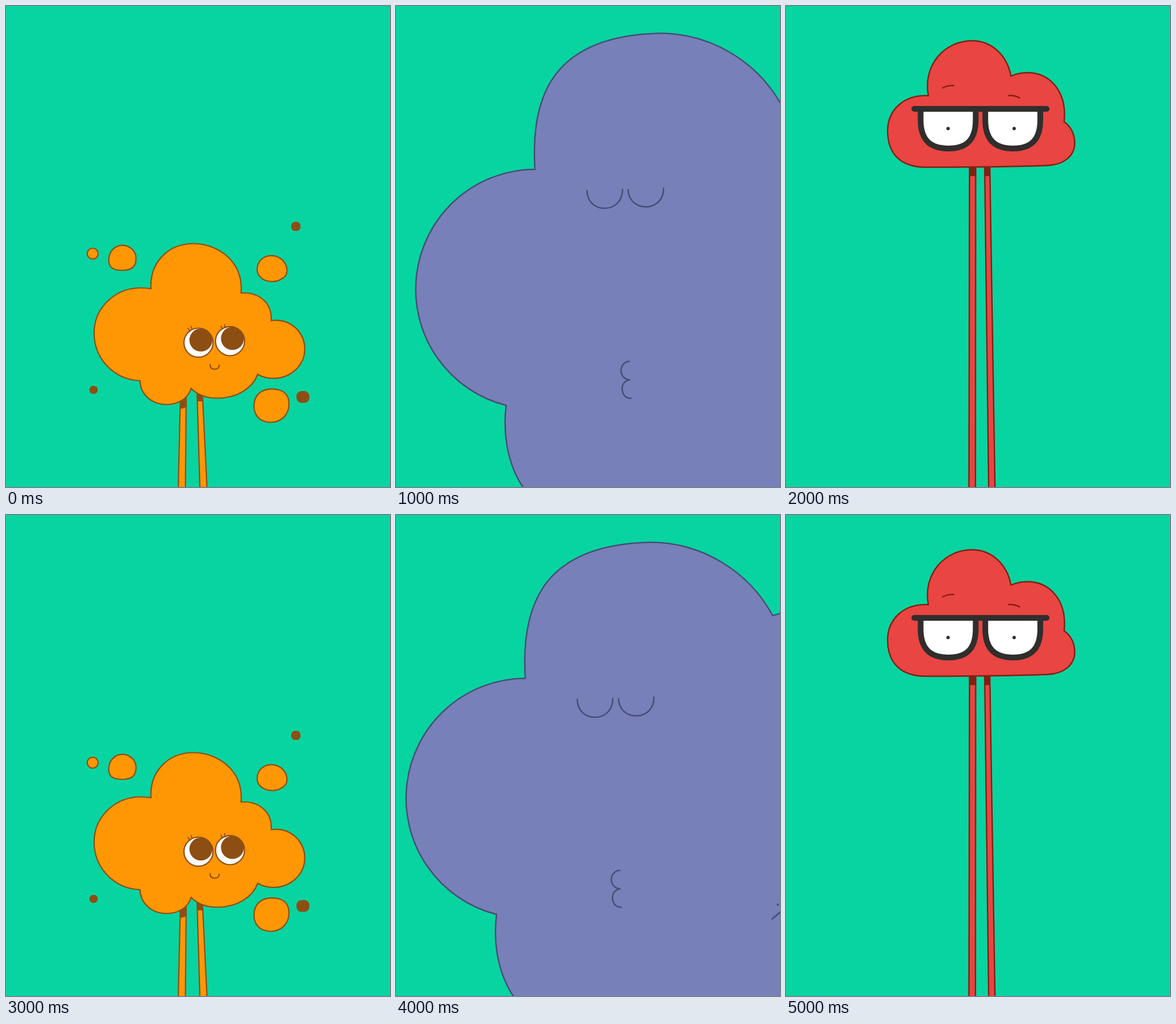
An HTML page for the animation above (6000 ms loop, 669 px wide and 837 px high).

```html
<!DOCTYPE html>
<html lang="en">
<head>
<meta charset="utf-8">
<title>Clouds</title>
<style>
  html, body { margin: 0; height: 100%; overflow: hidden; background: #08d4a1; }
  svg { display: block; width: 669px; height: 837px; }
  .scene { display: none; stroke-linejoin: miter; stroke-linecap: round; }
  .line { fill: none; }
  #orange { fill: #ff9604; stroke: #8d4e14; stroke-width: 2.2; }
  #orange .dark { fill: #8d4e14; stroke: none; }
  #purple { fill: #7780b8; stroke: #484d76; stroke-width: 2.5; }
  #purple .dark { fill: #484d76; stroke: none; }
  #red { fill: #e94542; stroke: #841f12; stroke-width: 2.4; }
  #red .dark { fill: #841f12; stroke: none; }
  #red .glasses { stroke: #302e2d; stroke-width: 10; }
  #red .pupil { fill: #302e2d; stroke: none; }
  .white { fill: #fff; }
</style>
</head>
<body>
<svg viewBox="0 0 669 837">
  <g id="orange" class="scene">
    <path d="M304 670L300 845H312.5L314 670Z M332.5 660L338 845H350.5L341.5 660Z"/>
    <path class="dark" d="M303 670H315V697Q309 701 303 701Z M331.5 660H342L343 688H333Z"/>
    <path d="M252.5 492C250 447 282 413.5 326 413.5C370 413.5 414 445 409.5 499.5
      C440 497 464 516 462 547.5C497 543 520.5 569 520.5 597C520.5 626 495 648 466 648
      C456 648 446 645.5 438.5 641C430 664 404 682.5 368 682.5C350 682.5 334 677 322.5 665.5
      C317 684 299 693.5 280 693.5C253 693.5 234 675 233.5 652C187 650 153.5 613 153.5 569
      C153.5 525 190 490.5 235 490.5C241 490.5 247 491 252.5 492Z"/>
    <circle class="white" cx="335.3" cy="585.8" r="25.3"/>
    <circle class="white" cx="390.3" cy="583.2" r="25.3"/>
    <circle class="dark" cx="339.5" cy="581.3" r="20"/>
    <circle class="dark" cx="394.5" cy="578.5" r="20"/>
    <path class="line" stroke-width="1.8" d="M317 561L320.5 566M322.5 557.5L324 563M374.5 557L377 562M381 554.5L382 560"/>
    <path class="line" d="M355.5 624C355.5 629 358.5 632 363.5 632S371.5 629 371.5 625"/>
    <circle cx="151" cy="431" r="9.5"/>
    <path d="M203 416.3C215 416.3 226 426 226.5 438C227 453 220 460 203 460S179 455 179 442C179 427 190 416.3 203 416.3Z"/>
    <path d="M462 434.3C477 434.3 489.5 446 489.5 460C489.5 470 484 473 478 476C474 478.5 469 479.5 464 479.5C448 479.5 437.5 470 437.5 458.5C437.5 444 449 434.3 462 434.3Z"/>
    <path d="M463 666.3C482 666.3 493 675 493 692C493 711 480 724.5 461 724.5S432 712 432 696C432 678 444 666.3 463 666.3Z"/>
    <rect class="dark" x="497" y="375.5" width="16" height="16" rx="6.5"/>
    <rect class="dark" x="145.3" y="661" width="14.6" height="14" rx="6.5"/>
    <rect class="dark" x="506" y="670" width="22.6" height="20.6" rx="9"/>
  </g>

  <g id="purple" class="scene">
    <path d="M242 284.3C234 155 274 52 459 47.5A243 243 0 0 1 673 175L720 162V860H236L221 837
      C195 798 185.5 745 192 695A208.5 208.5 0 0 1 242 284.3Z"/>
    <path class="line" d="M332.5 321C333 340 346 352 363.5 352S395 339 394.5 319"/>
    <path class="line" d="M404.5 319.5C404.5 337 418 349.5 435.5 349.5S467 336 466 317"/>
    <path class="line" d="M406.5 618.5C398 618.5 392 626 392 634.5C392 643.5 399 650.5 408 650.5
      C399 651 394 658 394 666C394 676 400 683 409.5 682.5"/>
    <path class="line" d="M672 703L690 688"/>
    <circle class="dark" cx="682" cy="678" r="2"/>
  </g>

  <g id="red" class="scene">
    <path d="M319.8 270L318.7 845H330L330.5 270Z M346 270L353.2 845H364.2L354.9 270Z"/>
    <path class="dark" d="M319 275H331V296H319Z M345 275H355.5L356 296H346Z"/>
    <path d="M248 156C238 103 276 60.5 324 60.5C358 60.5 385 85 392 122C401 118 411 116 420 116
      C461 116 490 150 484.5 201.5C497 210 503 224 503 238C503 262 483 276.5 455 277.5
      C400 279.5 330 280.5 243 280.5C198 280.5 177 255 177 218C177 180 206 154 248 156Z"/>
    <path class="line" d="M273 142.5Q282 137.5 292 138.5M388 156Q397 154.5 407 160"/>
    <path class="glasses white" d="M234.5 179V198C234.5 232 250 248 283 248S330.5 232 330.5 198V179"/>
    <path class="glasses white" d="M347.2 179V198C347.2 232 363 248 395.5 248S443 232 443 198V179"/>
    <path class="glasses" d="M223.5 179H454"/>
    <circle class="pupil" cx="282.4" cy="213.2" r="2.9"/>
    <circle class="pupil" cx="397.5" cy="213.2" r="2.9"/>
  </g>
</svg>
<script>
  const BEAT = 1000, BEATS = 6;
  const scenes = ["orange", "purple", "red"].map(id => document.getElementById(id));
  const start = performance.now();

  function draw() {
    const beat = Math.floor((performance.now() - start) / BEAT) % BEATS;
    scenes.forEach((scene, i) => {
      scene.style.display = i === beat % scenes.length ? "inline" : "none";
    });
    // The purple cloud sits further left on its second appearance.
    scenes[1].setAttribute("transform", `translate(${beat === 4 ? -16.8 : 0} 0)`);
    requestAnimationFrame(draw);
  }
  draw();
</script>
</body>
</html>
```
